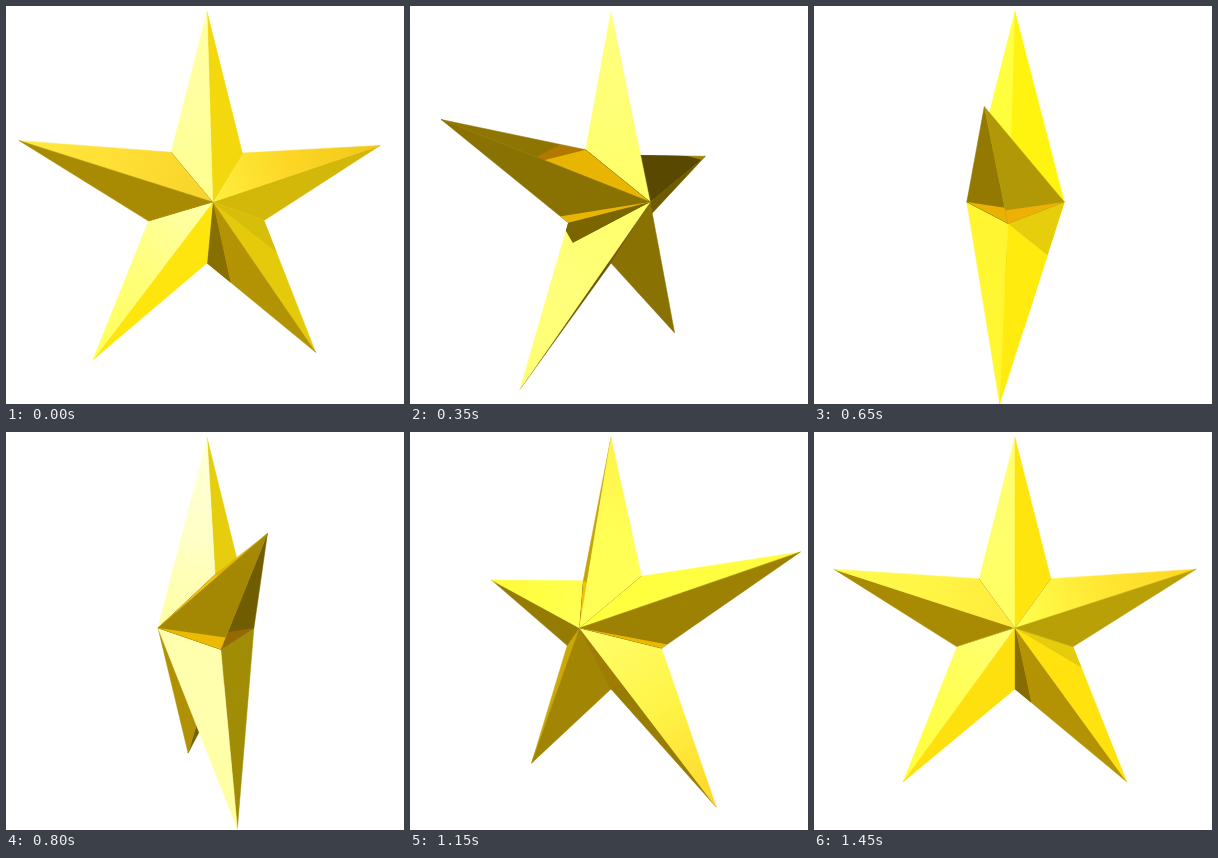
Animation of 398x398 px, one loop 1500 ms. Source, as an HTML page with a canvas:

```html
<!DOCTYPE html>
<html>
<head>
<meta charset="utf-8">
<title>Spinning gold star</title>
<style>
html, body { margin: 0; width: 100%; height: 100%; overflow: hidden; background: #fff; }
canvas { display: block; }
</style>
</head>
<body>
<canvas id="stage" width="398" height="398"></canvas>
<script>
const ctx = document.getElementById('stage').getContext('2d');
const CX = 201, CY = 196, EYE = [0, 0, 470];
const OUTER = 190.5, INNER = 61, DEPTH = 49;
const STEP = 50, STEPS = 30;

// Directions towards the lights; y points down
const KEY = [-0.56, -0.615, 0.56];
const FILL = [0, 0.5, 0.86];
const GLOW = [0.66, 0.17, 0.73];
const AMBIENT = [85, 70, 0], GOLD = [1, 0.82, 0.03], LEMON = [1, 0.95, 0.1], WHITE = [1, 1, 1];
const MIRROR = [1, 0.78, 0];

const dot = (a, b) => a[0] * b[0] + a[1] * b[1] + a[2] * b[2];
const sub = (a, b) => a.map((v, i) => v - b[i]);
const along = (a, dir, k) => a.map((v, i) => v + dir[i] * k);
const unit = a => a.map(v => v / Math.hypot(...a));
const mix = (a, b, k) => along(a, sub(b, a), k);
const rgb = c => `rgb(${c.map(v => Math.round(Math.min(255, v))).join()})`;
const depth = pts => pts.reduce((sum, p) => sum + p[2], 0) / pts.length;
const nearer = (a, b) => depth(a.pts) - depth(b.pts);

function smooth(from, to, v) {
  const k = Math.min(1, Math.max(0, (v - from) / (to - from)));
  return k * k * (3 - 2 * k);
}

function normal(a, b, c) {
  const [x, y, z] = sub(b, a), [u, v, w] = sub(c, a);
  const n = unit([y * w - z * v, z * u - x * w, x * v - y * u]);
  return dot(n, a) < 0 ? n.map(value => -value) : n;
}

// Colour without the key light, as seen in its shadow
function shadeDim(n) {
  const dim = along(AMBIENT, GOLD, 55 * Math.max(0, dot(n, FILL)));
  return along(dim, LEMON, 130 * smooth(0.82, 0.92, dot(n, GLOW)));
}

function shade(n, point) {
  const half = unit(along(unit(sub(EYE, point)), KEY, 1));
  const lit = along(shadeDim(n), GOLD, 150 * Math.max(0, dot(n, KEY)));
  return along(lit, WHITE, 265 * Math.max(0, dot(n, half)) ** 9.5);
}

function spoke(turn, radius) {
  const angle = turn * Math.PI / 5;
  return [radius * Math.sin(angle), -radius * Math.cos(angle), 0];
}

const facets = [];
for (let k = 0; k < 5; k++)
  for (const side of [-1, 1])
    for (const face of [-1, 1])
      facets.push([[0, 0, face * DEPTH], spoke(2 * k, OUTER), spoke(2 * k + side, INNER)]);

function project([x, y, z]) {
  const s = EYE[2] / (EYE[2] - z);
  return [CX + x * s, CY + y * s];
}

function trace(pts) {
  ctx.beginPath();
  for (const p of pts) ctx.lineTo(...project(p));
  ctx.closePath();
}

// Part of a polygon in front of the plane through base with normal n
function clipFront(pts, base, n) {
  const out = [];
  pts.forEach((p, i) => {
    const q = pts[(i + 1) % pts.length];
    const a = dot(n, sub(p, base)) - 0.01, b = dot(n, sub(q, base)) - 0.01;
    if (a > 0) out.push(p);
    if (a > 0 !== b > 0) out.push(along(p, sub(q, p), a / (a - b)));
  });
  return out;
}

function paintShadows({ pts: [base], n }, all) {
  const lit = dot(n, KEY);
  if (lit < 0.02) return;
  const drop = p => along(p, KEY, -dot(n, sub(p, base)) / lit);
  ctx.fillStyle = rgb(shadeDim(n));
  for (const other of all) {
    trace(clipFront(other.pts, base, n).map(drop));
    ctx.fill();
  }
}

function paintReflections({ pts: [base], n }, all) {
  const flip = p => along(p, n, -2 * dot(n, sub(p, base)));
  const eye = flip(EYE);
  ctx.globalCompositeOperation = 'lighten';
  ctx.globalAlpha = 0.8;
  for (const other of all) {
    if (dot(other.n, sub(eye, other.pts[0])) <= 0) continue;
    trace(clipFront(other.pts, base, n).map(flip));
    ctx.fillStyle = rgb(other.color.map((v, i) => Math.min(255, v) * MIRROR[i]));
    ctx.fill();
  }
}

function paintFacet(facet, all) {
  const { pts, n } = facet;
  const [base, tip] = pts;
  const fill = ctx.createLinearGradient(...project(base), ...project(tip));
  for (const k of [0, 0.5, 1]) fill.addColorStop(k, rgb(shade(n, mix(base, tip, k))));
  ctx.save();
  trace(pts);
  ctx.fillStyle = ctx.strokeStyle = fill;
  ctx.lineWidth = 0.5;
  ctx.lineJoin = 'bevel';
  ctx.fill();
  ctx.stroke();
  ctx.clip();
  paintShadows(facet, all);
  paintReflections(facet, all);
  ctx.restore();
}

function draw(angle) {
  const c = Math.cos(angle), s = Math.sin(angle);
  const all = facets.map(corners => {
    const pts = corners.map(([x, y, z]) => [x * c + z * s, y, z * c - x * s]);
    const n = normal(...pts);
    return { pts, n, color: shade(n, mix(pts[0], pts[1], 0.4)) };
  });
  ctx.fillStyle = '#fff';
  ctx.fillRect(0, 0, 398, 398);
  all.filter(f => dot(f.n, sub(EYE, f.pts[0])) > 0)
    .sort(nearer)
    .forEach(f => paintFacet(f, all));
}

const start = performance.now();
let shown = -1;
function tick() {
  const step = Math.floor((performance.now() - start) / STEP) % STEPS;
  if (step !== shown) draw((step + 1) * Math.PI / STEPS);
  shown = step;
  requestAnimationFrame(tick);
}
tick();
</script>
</body>
</html>
```
